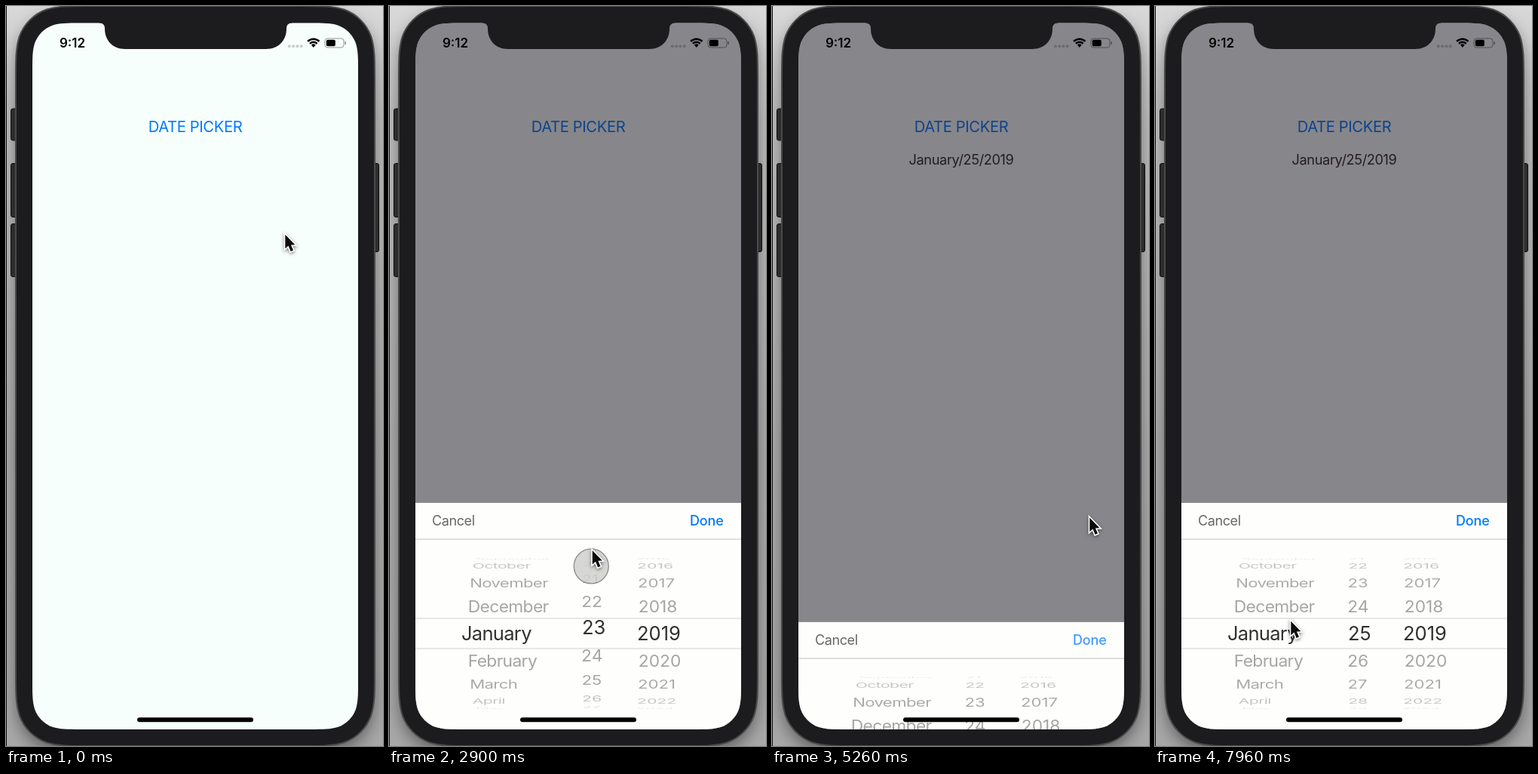
An HTML page with a canvas that plays this animation: 500x980 px, repeating every 8 s.

```html
<!DOCTYPE html>
<html lang="en">
<head>
<meta charset="utf-8">
<title>Date picker</title>
<style>
html, body { margin: 0; width: 100%; height: 100%; overflow: hidden; background: #aaa; }
canvas { display: block; width: 500px; height: 980px; }
</style>
</head>
<body>
<canvas id="stage"></canvas>
<script>
const LOOP = 8000;
const FONT = 'Inter, "Liberation Sans", sans-serif';
const BLUE = '#007aff';
const BEZEL = '#1c1c1e';
const MONTHS = ['January', 'February', 'March', 'April', 'May', 'June', 'July',
  'August', 'September', 'October', 'November', 'December'];
const ROW_ANGLE = 0.37, RADIUS = 99.5;

const canvas = document.getElementById('stage');
const dpr = window.devicePixelRatio || 1;
canvas.width = 500 * dpr;
canvas.height = 980 * dpr;
const g = canvas.getContext('2d');

const clamp = v => Math.max(0, Math.min(1, v));
const span = (t, a, b) => clamp((t - a) / (b - a));
const sine = p => 0.5 - 0.5 * Math.cos(Math.PI * p);
const quad = p => p < 0.5 ? 2 * p * p : 1 - 2 * (1 - p) * (1 - p);
const mod = (n, m) => ((n % m) + m) % m;

// Pointer moves: start, end, x, y, optional bend point
const MOVES = [
  [60, 830, 261, 161],
  [1560, 2330, 266, 833, 243, 480],
  [2400, 3100, 269, 692],
  [3800, 4250, 415, 710],
  [4250, 4600, 418, 681],
  [4630, 4730, 420, 675],
  [5830, 6630, 275, 157],
  [7170, 7700, 182, 810, 218, 480],
  [7930, 7960, 179, 812]
];

function pointer(t) {
  let x = 369, y = 300;
  for (const [a, b, ex, ey, cx = (x + ex) / 2, cy = (y + ey) / 2] of MOVES) {
    if (t <= a) break;
    const p = sine(span(t, a, b)), q = 1 - p;
    x = q * q * x + 2 * p * q * cx + p * p * ex;
    y = q * q * y + 2 * p * q * cy + p * p * ey;
  }
  return { x, y };
}

// Touch follows the pointer with a short delay while dragging
const touch = t => pointer(t > 2400 && t < 3300 ? Math.max(2400, t - 85) : t);

function dayPos(t) {
  const drag = u => 21 + Math.max(0, 833 - touch(u).y - 10) / (RADIUS * ROW_ANGLE);
  if (t < 2400) return 21;
  if (t < 3220) return drag(t);
  const p = 1 - span(t, 3220, 3630);
  return 25 + (drag(3219) - 25) * p * p * p;
}

function sheetShown(t) {
  if (t < 1200 || (t >= 5430 && t < 6930)) return null;
  if (t >= 6930) return quad(span(t, 6821, 7121));
  if (t >= 5000) return 1 - quad(span(t, 5107, 5407));
  return quad(span(t, 1092, 1392));
}

function pressFade(t, down, up) {
  if (t < up) return 1 - 0.8 * span(t, down, down + 110);
  return 0.2 + 0.8 * span(t, up, up + 220);
}

function box(x, y, w, h, r, fill, stroke, width = 1) {
  g.beginPath();
  g.roundRect(x, y, w, h, r);
  if (fill) { g.fillStyle = fill; g.fill(); }
  if (stroke) { g.strokeStyle = stroke; g.lineWidth = width; g.stroke(); }
}

// Rectangle whose corners blend smoothly into the sides
function smoothRect(x, y, w, h, r) {
  const corner = (cx, cy, ux, uy, vx, vy) => {
    const at = (a, b) => [cx + r * (a * ux + b * vx), cy + r * (a * uy + b * vy)];
    g.lineTo(...at(1.529, 0));
    g.bezierCurveTo(...at(1.088, 0), ...at(0.868, 0), ...at(0.631, 0.075));
    g.bezierCurveTo(...at(0.373, 0.169), ...at(0.169, 0.373), ...at(0.075, 0.631));
    g.bezierCurveTo(...at(0, 0.868), ...at(0, 1.088), ...at(0, 1.529));
  };
  g.beginPath();
  corner(x, y, 1, 0, 0, 1);
  corner(x, y + h, 0, -1, 1, 0);
  corner(x + w, y + h, -1, 0, 0, -1);
  corner(x + w, y, 0, 1, -1, 0);
  g.closePath();
}

function line(y, color) {
  g.fillStyle = color;
  g.fillRect(35, y, 432, 1.3);
}

function text(str, x, y, size, color, { align = 'left', weight = 400, track = -0.022 } = {}) {
  g.font = `${weight} ${size}px ${FONT}`;
  g.letterSpacing = `${size * track}px`;
  g.textAlign = align;
  g.fillStyle = color;
  g.fillText(str, x, y);
}

function drawBackdrop() {
  const bg = g.createLinearGradient(0, 0, 0, 980);
  bg.addColorStop(0, '#d9d9da');
  bg.addColorStop(0.15, '#bfbfbf');
  bg.addColorStop(0.6, '#adadad');
  bg.addColorStop(1, '#a8a8a8');
  g.fillStyle = bg;
  g.fillRect(0, 0, 500, 980);
  g.save();
  g.shadowColor = 'rgba(0,0,0,.45)';
  g.shadowBlur = 22 * dpr;
  g.shadowOffsetY = 10 * dpr;
  g.fillStyle = BEZEL;
  smoothRect(14, 1, 474, 978, 64);
  g.fill();
  g.restore();
  g.fillStyle = '#111';
  g.fillRect(0, 0, 1, 980);
  for (const [x, y, h] of [[6.5, 136, 42], [6.5, 208.5, 71], [6.5, 288.5, 70], [486.5, 208.5, 117]])
    box(x, y, 8, h, 2.5, '#2d2d2e', '#0e0e0e');
  smoothRect(13, 0, 476, 980, 64);
  g.fill();
  g.fillStyle = BEZEL;
  g.fill();
  g.strokeStyle = '#4a4a4b';
  g.lineWidth = 2;
  g.stroke();
}

function drawNotch() {
  g.beginPath();
  g.moveTo(124, 20);
  g.lineTo(124, 22.5);
  g.quadraticCurveTo(131, 22.5, 131, 30);
  g.bezierCurveTo(131, 46, 142, 57, 158, 57);
  g.lineTo(345, 57);
  g.bezierCurveTo(361, 57, 372, 46, 372, 30);
  g.quadraticCurveTo(372, 22.5, 379, 22.5);
  g.lineTo(379, 20);
  g.fillStyle = BEZEL;
  g.fill();
}

function drawStatus() {
  text('9:12', 71, 55, 17, '#000', { weight: 600, track: 0 });
  g.fillStyle = 'rgba(0,0,0,.2)';
  for (let i = 0; i < 4; i++) {
    g.beginPath();
    g.arc(375.8 + i * 5.3, 53.3, 2, 0, 7);
    g.fill();
  }
  g.strokeStyle = '#000';
  g.lineWidth = 2.5;
  for (const r of [6.8, 10.9]) {
    g.beginPath();
    g.arc(407.8, 54.6, r, -Math.PI * 0.75, -Math.PI * 0.25);
    g.stroke();
  }
  g.beginPath();
  g.moveTo(407.8, 55);
  g.arc(407.8, 54.6, 4, -Math.PI * 0.75, -Math.PI * 0.25);
  g.fillStyle = '#000';
  g.fill();
  box(423, 43, 25, 12, 3.5, null, 'rgba(0,0,0,.42)');
  box(424.8, 44.8, 12, 8.5, 1.8, '#000');
  box(449.3, 47, 1.6, 4.2, 1, 'rgba(0,0,0,.42)');
}

const COLUMNS = [
  { x: 104, c: 189, big: 96, track: -0.028, label: i => MONTHS[mod(i, 12)] },
  { x: 255, c: 270, big: 256, track: 0, label: i => String(mod(i - 1, 31) + 1) },
  { x: 331, c: 307, big: 329, track: 0, label: i => String(i) }
];

function drawRows(col, pos, mid, big) {
  const first = Math.round(pos);
  for (let i = first - 5; i <= first + 5; i++) {
    const angle = (i - pos) * ROW_ANGLE;
    if (Math.abs(angle) > 1.54) continue;
    const cos = Math.cos(angle);
    const scale = big ? 1.11 : 1 - 0.143 * (1 - cos);
    const x = big ? col.big : col.c + (col.x - col.c) * scale;
    const shade = big ? 0.81 : 0.35 * Math.min(1, cos + 0.2);
    g.save();
    g.translate(x, mid + RADIUS * Math.sin(angle) * (big ? 1.11 : 1));
    g.scale(scale, scale * cos);
    text(col.label(i), 0, 8.4, 23, `rgba(0,0,0,${shade})`, { track: col.track });
    g.restore();
  }
}

function drawSheet(t, shown) {
  const top = 958 - 300 * shown, mid = top + 173;
  g.fillStyle = '#fefefc';
  g.fillRect(35, top, 432, 302);
  text('Cancel', 57, top + 30.3, 18, '#666');
  g.globalAlpha = pressFade(t, 5000, 5110);
  text('Done', 443.5, top + 30.3, 18, BLUE, { align: 'right', weight: 500, track: -0.012 });
  g.globalAlpha = 1;
  line(top + 47.5, '#cfd0d0');

  const pos = [0, dayPos(t), 2019];
  for (const big of [false, true]) {
    g.save();
    g.beginPath();
    if (big) g.rect(35, mid - 20, 432, 40);
    else {
      g.rect(35, top + 48, 432, 105);
      g.rect(35, mid + 20, 432, 110);
    }
    g.clip();
    COLUMNS.forEach((col, i) => drawRows(col, pos[i], mid, big));
    g.restore();
  }
  line(mid - 20.7, '#dcdddd');
  line(mid + 19.3, '#dcdddd');
}

function drawTouch(t) {
  const down = [[910, 1040], [2410, 3235], [5010, 5100], [6710, 6830]].some(([a, b]) => t >= a && t < b);
  if (!down) return;
  const { x, y } = touch(t);
  g.beginPath();
  g.arc(x + 0.3, y, 23, 0, 7);
  g.fillStyle = 'rgba(207,207,207,.83)';
  g.fill();
  g.strokeStyle = 'rgba(95,95,95,.65)';
  g.lineWidth = 1.4;
  g.stroke();
}

function drawPointer({ x, y }) {
  g.save();
  g.translate(x, y);
  g.beginPath();
  [[1.3, 2.8], [1.3, 21.2], [5.5, 17.4], [8.6, 25], [12, 23.6], [8.9, 16.4], [14.4, 16.2]]
    .forEach(([px, py]) => g.lineTo(px, py));
  g.closePath();
  g.shadowColor = 'rgba(0,0,0,.5)';
  g.shadowBlur = 4 * dpr;
  g.shadowOffsetY = 1.5 * dpr;
  g.strokeStyle = '#fff';
  g.lineWidth = 3.2;
  g.stroke();
  g.shadowColor = 'transparent';
  g.fillStyle = '#0c0a0c';
  g.fill();
  g.restore();
}

function draw(t) {
  g.setTransform(dpr, 0, 0, dpr, 0, 0);
  drawBackdrop();
  g.save();
  smoothRect(35, 22.5, 432, 935.5, 42);
  g.clip();
  g.fillStyle = '#f7fffd';
  g.fillRect(35, 22, 432, 937);

  g.globalAlpha = t < 5000 ? pressFade(t, 900, 1130) : pressFade(t, 6700, 6895);
  text('DATE PICKER', 251, 167, 20.2, BLUE, { align: 'center', track: -0.018 });
  g.globalAlpha = 1;
  if (t >= 5107) text('January/25/2019', 251, 210.3, 18.2, '#2c2c2c', { align: 'center' });

  const shown = sheetShown(t);
  if (shown !== null) {
    g.fillStyle = 'rgba(25,15,25,.5)';
    g.fillRect(35, 22, 432, 937);
    drawSheet(t, shown);
  }
  drawStatus();
  box(174, 942.3, 154, 6, 3, '#000');
  drawTouch(t);
  g.restore();
  drawNotch();
  drawPointer(pointer(t));
}

const start = performance.now();
function tick() {
  draw((performance.now() - start) % LOOP);
  requestAnimationFrame(tick);
}
tick();
</script>
</body>
</html>
```
